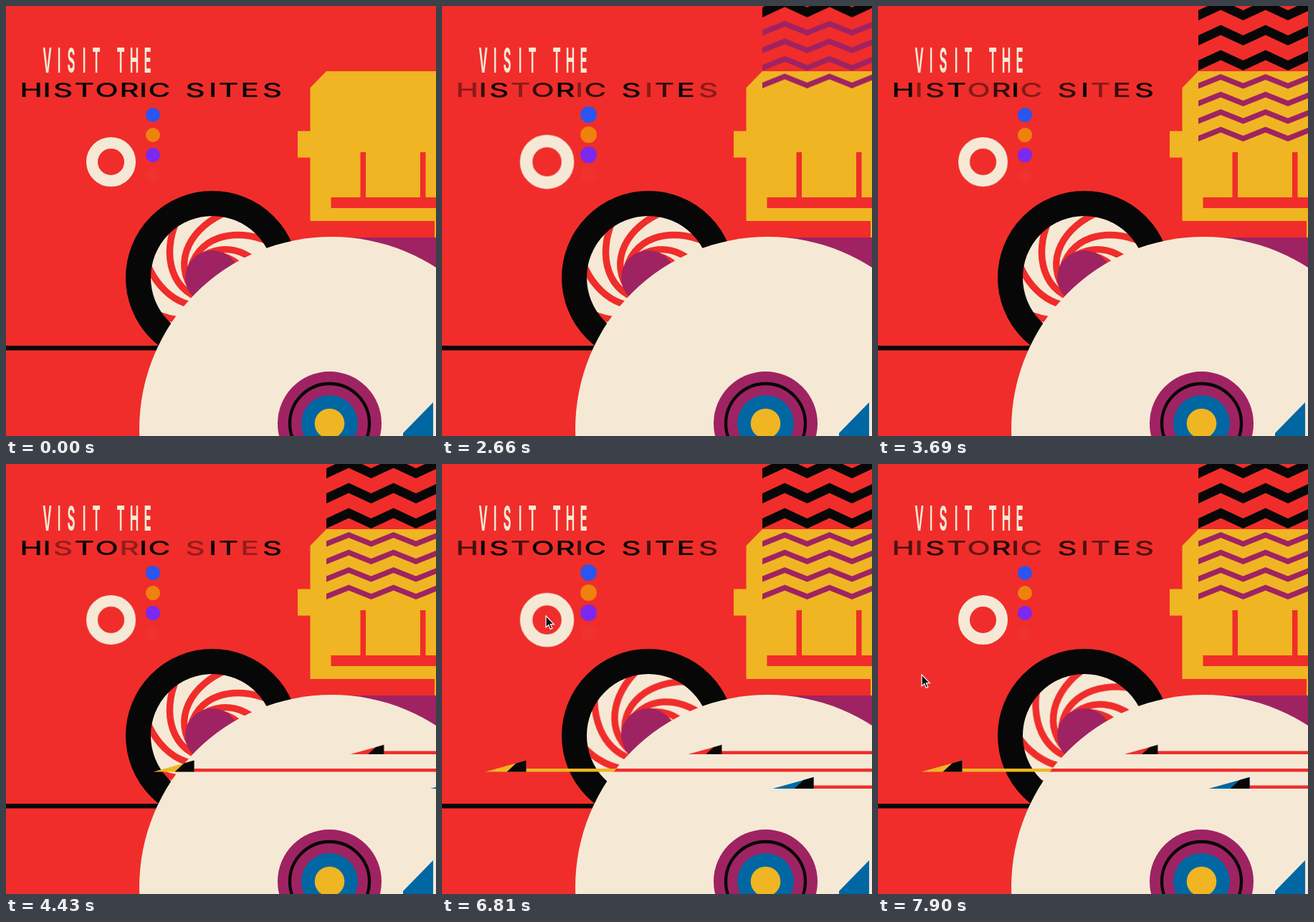
Recreate the animation shown at these times as an HTML page. Size 600 px wide and 600 px high, loop 8 s.

```html
<!DOCTYPE html>
<html lang="en">
<head>
<meta charset="utf-8">
<title>Visit the historic sites</title>
<style>
html, body { margin: 0; width: 100%; height: 100%; overflow: hidden; background: #f02d2a; }
svg { display: block; width: 100%; height: 100%; }
text { font-family: Inter, "Liberation Sans", sans-serif; text-anchor: middle; }
.thin { font-size: 48px; font-weight: 700; fill: #f5e9d6; }
.wide { font-size: 27.5px; font-weight: 500; fill: #070707; }

.wave0, .wave1, .wave2, .pulse, .spin, .zigs, .dart, .cursor {
  animation: 8s linear infinite;
}
.wave0, .wave1, .wave2, .pulse, .zigs { animation-timing-function: ease-in-out; }
.wave0 { animation-name: wave0; }
.wave1 { animation-name: wave1; }
.wave2 { animation-name: wave2; }
.pulse { --peak: 1.1; animation-name: pulse; transform-box: fill-box; transform-origin: center; }
.dot { --peak: 1.15; transform-origin: 65% 65%; }
.spin { animation-name: spin; }
.zigs { animation-name: drop; }
.red { animation-name: red; }
.yellow { animation-name: yellow; }
.blue { animation-name: blue; }
.cursor { animation-name: point; }

@keyframes wave0 {
  0%, 10%, 47.5%, 79.4% { fill-opacity: 1; }
  30% { fill-opacity: .4; }
  92% { fill-opacity: .4; animation-timing-function: ease-in; }
  100% { fill-opacity: .8; }
}
@keyframes wave1 {
  0%, 27.5%, 58.75% { fill-opacity: 1; }
  42.5% { fill-opacity: .4; }
  92.5% { fill-opacity: 1; animation-timing-function: linear; }
  100% { fill-opacity: .52; }
}
@keyframes wave2 {
  0%, 40%, 72.5%, 94.4% { fill-opacity: 1; }
  56.25% { fill-opacity: .4; }
  100% { fill-opacity: .87; }
}
@keyframes pulse {
  0%, 9%, 45.5%, 58%, 97%, 100% { transform: scale(1); }
  31%, 82.5% { transform: scale(var(--peak)); }
}
@keyframes spin {
  0%, 65% { transform: rotate(0deg); }
  85.1% { transform: rotate(24deg); }
  100% { transform: rotate(33.5deg); }
}
@keyframes drop {
  0%, 21.25% { transform: translateY(-191px); }
  42.5%, 100% { transform: none; }
}
@keyframes yellow {
  0%, 48% { transform: translateX(545px); animation-timing-function: ease-out; }
  61.5%, 100% { transform: none; }
}
@keyframes red {
  0%, 50% { transform: translateX(270px); animation-timing-function: ease-out; }
  66%, 100% { transform: none; }
}
@keyframes blue {
  0%, 53% { transform: translateX(200px); animation-timing-function: ease-out; }
  63.5%, 100% { transform: none; }
}
@keyframes point {
  0% { opacity: 0; transform: translate(145px, 212px); animation-timing-function: step-end; }
  61% { opacity: 1; transform: translate(145px, 212px); }
  92.5% { opacity: 1; transform: translate(145px, 212px); animation-timing-function: ease-in-out; }
  98.2%, 100% { opacity: 1; transform: translate(61px, 294px); }
}
</style>
</head>
<body>
<svg viewBox="0 0 600 600" preserveAspectRatio="none">
  <defs>
    <circle id="plate" cx="454.5" cy="590.5" r="268.5"/>
    <clipPath id="disc"><use href="#plate"/></clipPath>
    <path id="arm" d="M93 11C70 -34 18 -62 -24 -22" fill="none" stroke="#f02d2a" stroke-width="9.5"/>
    <g id="head">
      <path d="M-57 0L-14 -12 0 -16V0Z"/>
      <path d="M-27 0L-14 -12 0 -16V0Z" fill="#070707"/>
    </g>
  </defs>

  <rect width="600" height="600" fill="#f02d2a"/>
  <text class="thin" id="top" transform="translate(0 93) scale(.35 1)"></text>
  <text class="wide" id="title" transform="translate(0 127) scale(1.55 1)"></text>

  <circle class="pulse" cx="146.5" cy="217.5" r="26.5" fill="none" stroke="#f5e9d6" stroke-width="16"/>
  <circle class="pulse dot" cx="205" cy="152" r="10" fill="#2b55ee"/>
  <circle class="pulse dot" cx="205" cy="180" r="10" fill="#ef820d"/>
  <circle class="pulse dot" cx="205" cy="208" r="10" fill="#7b28f0"/>
  <circle class="pulse dot" cx="205" cy="236" r="10" fill="#f0322e"/>

  <!-- building -->
  <path d="M480 323H600V380H480Z" fill="#9f2362"/>
  <path d="M447 91H600V323H598V300H424.5V211.5H407V174.5H424.5V114Z" fill="#f0b522"/>
  <path d="M494.5 204h7.5v63h-7.5ZM578 204h7.5v63h-7.5ZM453.5 267H600v15H453.5Z" fill="#f02d2a"/>
  <g class="zigs" id="zigs"></g>

  <!-- wheel -->
  <rect y="474" width="240" height="6.5" fill="#070707"/>
  <g transform="translate(288 379)">
    <circle r="90" fill="#f5e9d6"/>
    <g class="spin" id="arms"></g>
    <circle r="38" fill="#9f2362"/>
    <circle r="103.5" fill="none" stroke="#070707" stroke-width="35"/>
  </g>
  <rect class="dart yellow" x="117" y="425" width="600" height="4.5" fill="#f0b522"/>

  <!-- big disc -->
  <use href="#plate" fill="#f5e9d6"/>
  <g transform="translate(451.5 582.5)">
    <circle r="72.5" fill="#9f2362"/>
    <circle r="55.5" fill="none" stroke="#070707" stroke-width="4.3"/>
    <circle r="39.5" fill="#0067a3"/>
    <circle r="20.8" fill="#f0b522"/>
  </g>
  <path d="M554 596L596 553V600H554Z" fill="#0067a3"/>

  <!-- darts -->
  <g clip-path="url(#disc)" fill="#f02d2a">
    <rect class="dart red" x="390" y="400.5" width="600" height="4.5"/>
    <rect class="dart yellow" x="117" y="425" width="1100" height="4.5"/>
    <rect class="dart blue" x="518" y="448.5" width="600" height="4.5"/>
  </g>
  <g class="dart red" fill="#f02d2a"><use href="#head" transform="translate(390.3 405) scale(.82)"/></g>
  <g class="dart yellow" fill="#f0b522"><use href="#head" x="117.5" y="429.5"/></g>
  <g class="dart blue" fill="#0067a3"><use href="#head" x="518.5" y="453"/></g>

  <path class="cursor" d="M0 0V16L3.7 12.6 6.2 18.4 8.8 17.3 6.3 11.7H11.3Z" fill="#070707" stroke="#fff" stroke-width="1.2"/>
</svg>
<script>
const NS = 'http://www.w3.org/2000/svg';

function add(parent, tag, attrs) {
  const el = document.createElementNS(NS, tag);
  for (const k in attrs) el.setAttribute(k, attrs[k]);
  return document.getElementById(parent).appendChild(el);
}

// Sets each letter centred on its own x; letters cycle through three waves.
function letter(id, text, centres, scale, waves) {
  [...text].forEach((ch, i) => {
    const span = add(id, 'tspan', { x: centres[i] / scale });
    if (waves) span.setAttribute('class', 'wave' + i % 3);
    span.textContent = ch;
  });
}

function zigzag(bottom, rise, depth, fill) {
  const edge = [0, 1, 2, 3, 4, 5].map(i => [447 + 31.25 * i, bottom - i % 2 * rise]);
  const upper = edge.map(([x, y]) => [x, y - depth]).reverse();
  add('zigs', 'polygon', { points: [...edge, ...upper].join(' '), fill });
}

letter('top', 'VISITTHE', [57.5, 74, 91, 109, 126, 160, 179, 197.5], .35, false);
letter('title', 'HISTORICSITES',
  [35, 57, 79.5, 109.5, 140.5, 172, 191.5, 214, 264, 288.5, 310.5, 340, 371.5], 1.55, true);

for (let i = 0; i < 3; i++) zigzag(20 + 35 * i, 14.5, 14, '#070707');
for (let i = 0; i < 4; i++) zigzag(115.5 + 24.5 * i, 12.5, 8, '#9f2362');
for (let i = 0; i < 8; i++) add('arms', 'use', { href: '#arm', transform: `rotate(${6 + 45 * i})` });
</script>
</body>
</html>
```
